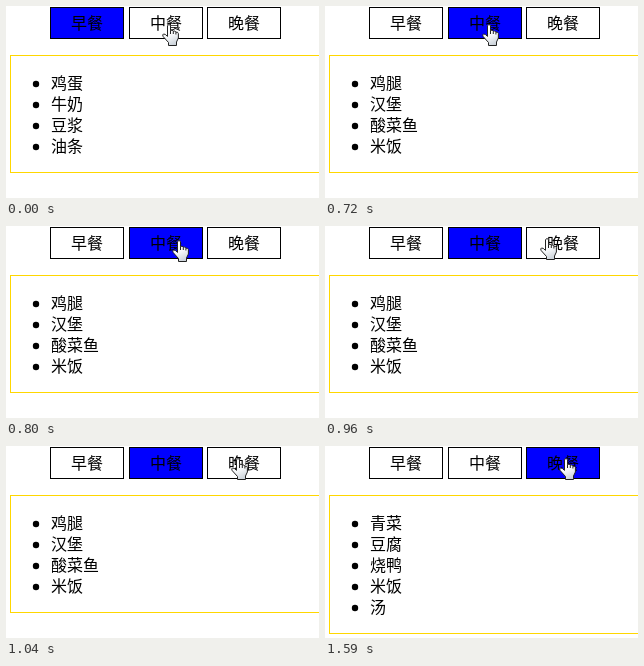
An HTML page with a canvas that plays this animation: 313x192 px, repeating every 2440 ms.

```html
<!DOCTYPE html>
<html lang="zh-CN">
<head>
<meta charset="utf-8">
<title>三餐</title>
<style>
html, body { margin: 0; width: 100%; height: 100%; overflow: hidden; background: #fff; }
canvas { display: block; width: 313px; height: 192px; }
</style>
</head>
<body>
<canvas id="stage"></canvas>
<script>
const W = 313, H = 192, LOOP = 2440;
const canvas = document.getElementById('stage');
const ctx = canvas.getContext('2d');
const scale = window.devicePixelRatio || 1;
canvas.width = W * scale;
canvas.height = H * scale;

const tabs = [
  { x: 44, label: '早餐', items: ['鸡蛋', '牛奶', '豆浆', '油条'] },
  { x: 123, label: '中餐', items: ['鸡腿', '汉堡', '酸菜鱼', '米饭'] },
  { x: 201, label: '晚餐', items: ['青菜', '豆腐', '烧鸭', '米饭', '汤'] }
];

// Pointer stops: [start ms, x, y, active tab]
const stops = [
  [0, 156, 18, 0], [70, 157, 18, 0], [720, 157, 18, 1],
  [800, 166, 14, 1], [880, 192, 11, 1], [960, 215, 12, 1],
  [1040, 225, 12, 1], [1120, 231, 12, 1], [1200, 234, 12, 1],
  [1590, 234, 12, 2]
];

const hand = new Path2D('M5.5 1.6Q7 -.6 8.5 1.6V6.6Q10.3 5.4 11.3 7.2' +
  'Q13 6.2 13.9 8.2Q15.8 7.5 16.4 9.6V14L14.5 18V21.5H6.5V18.5' +
  'L1.2 12.6Q0 10.6 1.5 10Q3 9.6 5.5 12.4Z');
const knuckles = new Path2D('M8.5 6.6V10M11.3 7.2V10M13.9 8.2V10.5');
const shade = ctx.createLinearGradient(5, 6, 13, 22);
shade.addColorStop(0, '#fff');
shade.addColorStop(0.4, '#f4f6f8');
shade.addColorStop(1, '#c4ccd4');

function frame(x, y, w, h, color, fill) {
  ctx.fillStyle = color;
  ctx.fillRect(x, y, w, h);
  ctx.fillStyle = fill;
  ctx.fillRect(x + 1, y + 1, w - 2, h - 2);
}

function text(str, x, y) {
  ctx.fillStyle = '#000';
  ctx.fillText(str, x, y);
}

function drawList(items) {
  frame(4, 49, W + 20, 34 + items.length * 21, '#ffd700', '#fff');
  items.forEach((item, i) => {
    const y = 78 + i * 21;
    text(item, 45, y + 5);
    ctx.beginPath();
    ctx.arc(30, y, 3.2, 0, Math.PI * 2);
    ctx.fill();
  });
}

function drawPointer(x, y) {
  ctx.save();
  ctx.translate(x, y);
  ctx.fillStyle = shade;
  ctx.strokeStyle = '#222';
  ctx.lineWidth = 1;
  ctx.lineJoin = 'round';
  ctx.fill(hand);
  ctx.stroke(hand);
  ctx.stroke(knuckles);
  ctx.restore();
}

function draw(time) {
  const [, x, y, active] = stops.filter(s => s[0] <= time).pop();
  ctx.setTransform(scale, 0, 0, scale, 0, 0);
  ctx.fillStyle = '#fff';
  ctx.fillRect(0, 0, W, H);
  ctx.font = '300 16px "Noto Sans CJK SC", "Noto Sans CJK", sans-serif';
  tabs.forEach((tab, i) => {
    frame(tab.x, 1, 74, 32, '#000', i === active ? '#00f' : '#fff');
    text(tab.label, tab.x + 21, 23);
  });
  drawList(tabs[active].items);
  drawPointer(x, y);
}

const start = performance.now();
function tick() {
  draw((performance.now() - start) % LOOP);
  requestAnimationFrame(tick);
}
tick();
</script>
</body>
</html>
```
